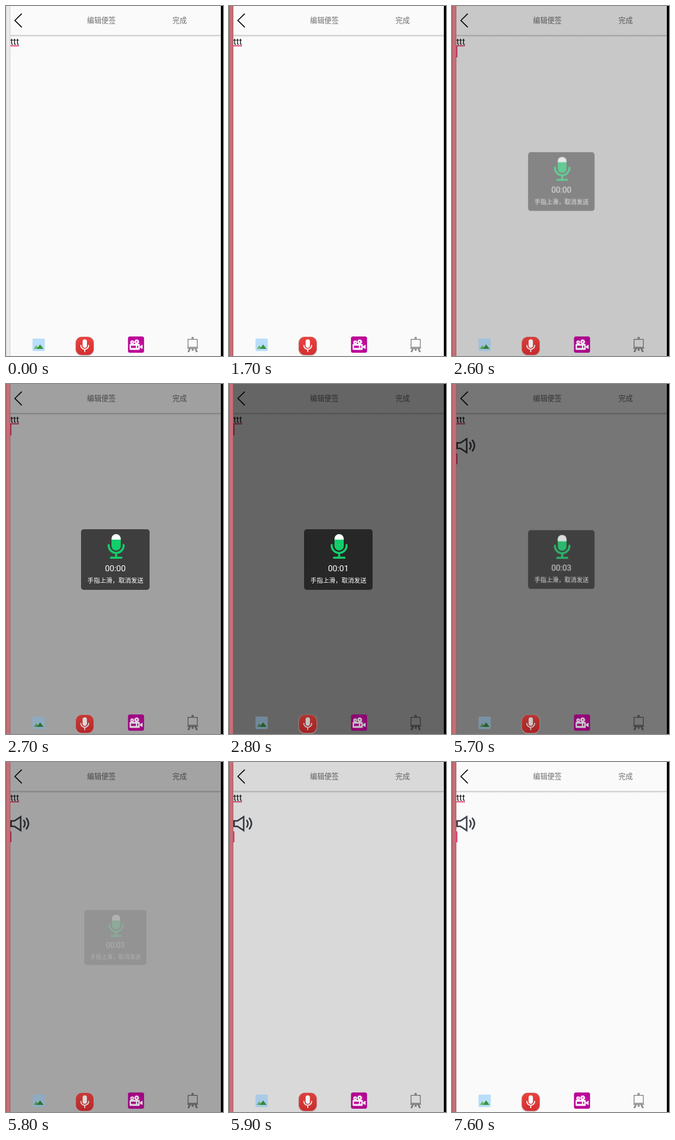
Recreate the animation shown at these times as an HTML page. Size 399x641 px, loop 8000 ms.

```html
<!DOCTYPE html>
<html lang="zh-CN">
<head>
<meta charset="utf-8">
<title>Voice note</title>
<style>
html, body { margin: 0; width: 100%; height: 100%; overflow: hidden; background: #fafafa; }
svg { display: block; width: 399px; height: 641px; }
text { font-family: Roboto, "Noto Sans CJK SC", "Noto Sans CJK", sans-serif; }
.line { fill: none; stroke-linecap: round; }

/* Every track shares one 8 s clock and changes in hard steps. */
#stage, .strip, .old, .new, .speaker, .toast, .level, .time {
  animation: 8s step-end infinite;
}
#stage { --d: 0; animation-name: dim; }
.dim { opacity: var(--d); }
.vivid { filter: brightness(calc(1 - var(--d) * .4)); }
.soft { filter: brightness(calc(1 - var(--d) * .65)); }
.strip { animation-name: strip; }
.old { animation-name: old; }
.new { animation-name: new; }
.speaker { animation-name: speaker; }
.toast { animation-name: toast; transform-origin: 201px 321.5px; }
.level { animation-name: level; }
.t0 { animation-name: t0; }
.t1 { animation-name: t1; }
.t2 { animation-name: t2; }
.t3 { animation-name: t3; }

@keyframes dim {
  0% { --d: 0; }
  31.25% { --d: .05; }
  32.5% { --d: .2; }
  33.75% { --d: .36; }
  35% { --d: .595; }
  36.25% { --d: .6; }
  71.25% { --d: .53; }
  72.5% { --d: .35; }
  73.75% { --d: .13; }
  75%, 100% { --d: 0; }
}
@keyframes strip {
  0% { fill: #ebebeb; stroke: #cdcdcd; }
  21.25%, 100% { fill: #c66f76; stroke: #a9565d; }
}
@keyframes old {
  0%, 10%, 21.25% { opacity: 0; }
  3.75%, 17.5%, 31.25% { opacity: 1; }
  71.25%, 100% { opacity: 0; }
}
@keyframes new {
  0%, 77.5%, 90% { opacity: 0; }
  71.25%, 82.5%, 95%, 100% { opacity: 1; }
}
@keyframes speaker {
  0% { opacity: 0; }
  71.25%, 100% { opacity: 1; }
}
@keyframes toast {
  0% { opacity: 0; transform: scale(.92); }
  32.5% { opacity: .55; transform: scale(.97); }
  33.75% { opacity: 1; transform: none; }
  71.25% { opacity: .75; transform: scale(.97); }
  72.5% { opacity: .16; transform: scale(.906); }
  73.75%, 100% { opacity: 0; transform: scale(.9); }
}
@keyframes level {
  0%, 38.75% { transform: translateY(0); }
  36.25% { transform: translateY(4px); }
  41.25% { transform: translateY(2px); }
  43.75% { transform: translateY(9px); }
  57.5% { transform: translateY(11px); }
  60% { transform: translateY(-2px); }
  61.25%, 65% { transform: translateY(5px); }
  62.5%, 68.75%, 100% { transform: translateY(2px); }
}
@keyframes t0 { 0% { opacity: 1; } 35%, 100% { opacity: 0; } }
@keyframes t1 { 0%, 57.5%, 100% { opacity: 0; } 35% { opacity: 1; } }
@keyframes t2 { 0%, 61.25%, 100% { opacity: 0; } 57.5% { opacity: 1; } }
@keyframes t3 { 0% { opacity: 0; } 61.25%, 100% { opacity: 1; } }
</style>
</head>
<body>
<svg id="stage" viewBox="0 0 399 641">
  <defs>
    <linearGradient id="shade" x2="0" y2="1">
      <stop stop-color="#bcbcbc"/>
      <stop offset=".4" stop-color="#dcdcdc"/>
      <stop offset="1" stop-color="#fafafa"/>
    </linearGradient>
    <linearGradient id="red" x2="0" y2="1">
      <stop stop-color="#e9443f"/>
      <stop offset="1" stop-color="#d62d31"/>
    </linearGradient>
    <radialGradient id="magenta">
      <stop stop-color="#d81fb4"/>
      <stop offset="1" stop-color="#b80695"/>
    </radialGradient>
    <clipPath id="capsule"><rect x="194" y="275" width="17" height="30" rx="8.5"/></clipPath>
  </defs>

  <rect width="399" height="641" fill="#fafafa"/>

  <!-- header -->
  <rect x="8" y="53" width="387" height="4" fill="url(#shade)"/>
  <path class="line" d="M28.5 14.5 16.3 26.4 28.5 38.5" stroke="#111" stroke-width="1.8"/>
  <g font-size="13.2" fill="#707070">
    <text x="149" y="31">编辑便签</text>
    <text x="306" y="31">完成</text>
  </g>

  <!-- note -->
  <text x="8" y="71" font-size="16.4" fill="#111">ttt</text>
  <rect x="8" y="72" width="16" height="1.8" fill="#e8325f"/>
  <rect class="old" x="8" y="74" width="2" height="20" fill="#ff4081"/>
  <g class="speaker">
    <g class="line" stroke="#3c404a" stroke-width="2.8">
      <path d="M9.4 107.8H15.5L27 100.3V125.3L15.5 117.8H9.4Z"/>
      <path d="M32.8 107q4.2 6 0 12M37.6 103.2q7.4 9.6 0 19.2"/>
    </g>
  </g>
  <rect class="new" x="8" y="127" width="2" height="20" fill="#ff4081"/>

  <!-- easel -->
  <g class="line" stroke="#777" stroke-width="1.3">
    <rect x="334.7" y="610.5" width="17" height="14.5"/>
    <path d="M333.5 626.8H353M342 610V607H344.3V610M337 627.5 334.8 633H336.6L339 627.5M349.4 627.5 351.6 633H349.8L347.4 627.5M342.2 627.5V630.5H344.3V627.5"/>
  </g>

  <rect class="dim" x="8" width="387" height="641"/>

  <!-- picture -->
  <g class="soft">
    <rect x="48.7" y="609" width="22.6" height="23" rx="2" fill="#b9defb"/>
    <path d="M51 628 55.8 621.5 60.5 628Z" fill="#66bb6a"/>
    <path d="M56.5 628 62.7 619.8 69 628Z" fill="#3b9440"/>
  </g>

  <!-- microphone -->
  <g class="vivid">
    <rect x="127.5" y="605.5" width="34.5" height="35" rx="11.5" fill="#c9b9b7"/>
    <rect x="128.5" y="606" width="32.5" height="33" rx="11" fill="url(#red)"/>
    <rect x="140.8" y="610.5" width="8" height="15.5" rx="4" fill="#fff"/>
    <path class="line" d="M137.6 621.5a7.2 7.2 0 0 0 14.4 0M144.8 629V633" stroke="#fff" stroke-width="1.9"/>
  </g>

  <!-- camera -->
  <g class="vivid">
    <rect x="224.3" y="605.3" width="29.5" height="29.7" rx="3.5" fill="url(#magenta)"/>
    <g fill="#fff">
      <circle cx="232" cy="616" r="3.4"/>
      <circle cx="240.3" cy="615" r="4.3"/>
      <rect x="227.3" y="619" width="18.5" height="10.7" rx="1.3"/>
      <path d="M246.3 623 251.2 620.3V628.3L246.3 625.7Z"/>
    </g>
    <g fill="#c813a5">
      <circle cx="232" cy="616" r="1"/>
      <circle cx="240.3" cy="615" r="1.2"/>
      <rect x="229.8" y="622" width="9" height="4.4"/>
      <rect x="241.2" y="622" width="2" height="4.4"/>
    </g>
  </g>

  <!-- recording panel -->
  <g class="toast">
    <rect x="138" y="266" width="126" height="111" rx="5" fill-opacity=".61"/>
    <g clip-path="url(#capsule)">
      <rect x="194" y="275" width="17" height="30" fill="#13ce6b"/>
      <rect class="level" x="194" y="255" width="17" height="30" fill="#fff"/>
    </g>
    <path class="line" d="M188.8 295v.7a13.7 13.7 0 0 0 27.4 0V295M202.5 310V318M193 318.2H212.3" stroke="#13ce6b" stroke-width="3.8"/>
    <g font-size="15.3" fill="#fff" text-anchor="middle">
      <text class="time t0" x="201" y="342.5">00:00</text>
      <text class="time t1" x="201" y="342.5">00:01</text>
      <text class="time t2" x="201" y="342.5">00:02</text>
      <text class="time t3" x="201" y="342.5">00:03</text>
    </g>
    <text x="149.8" y="364.3" font-size="11.45" fill="#fff">手指上滑，取消发送</text>
  </g>

  <!-- edges -->
  <g class="strip">
    <rect width="8" height="641" stroke="none"/>
    <path d="M.5 0V641M7.5 0V641"/>
  </g>
  <rect x="395" width="4" height="641"/>
</svg>
</body>
</html>
```
